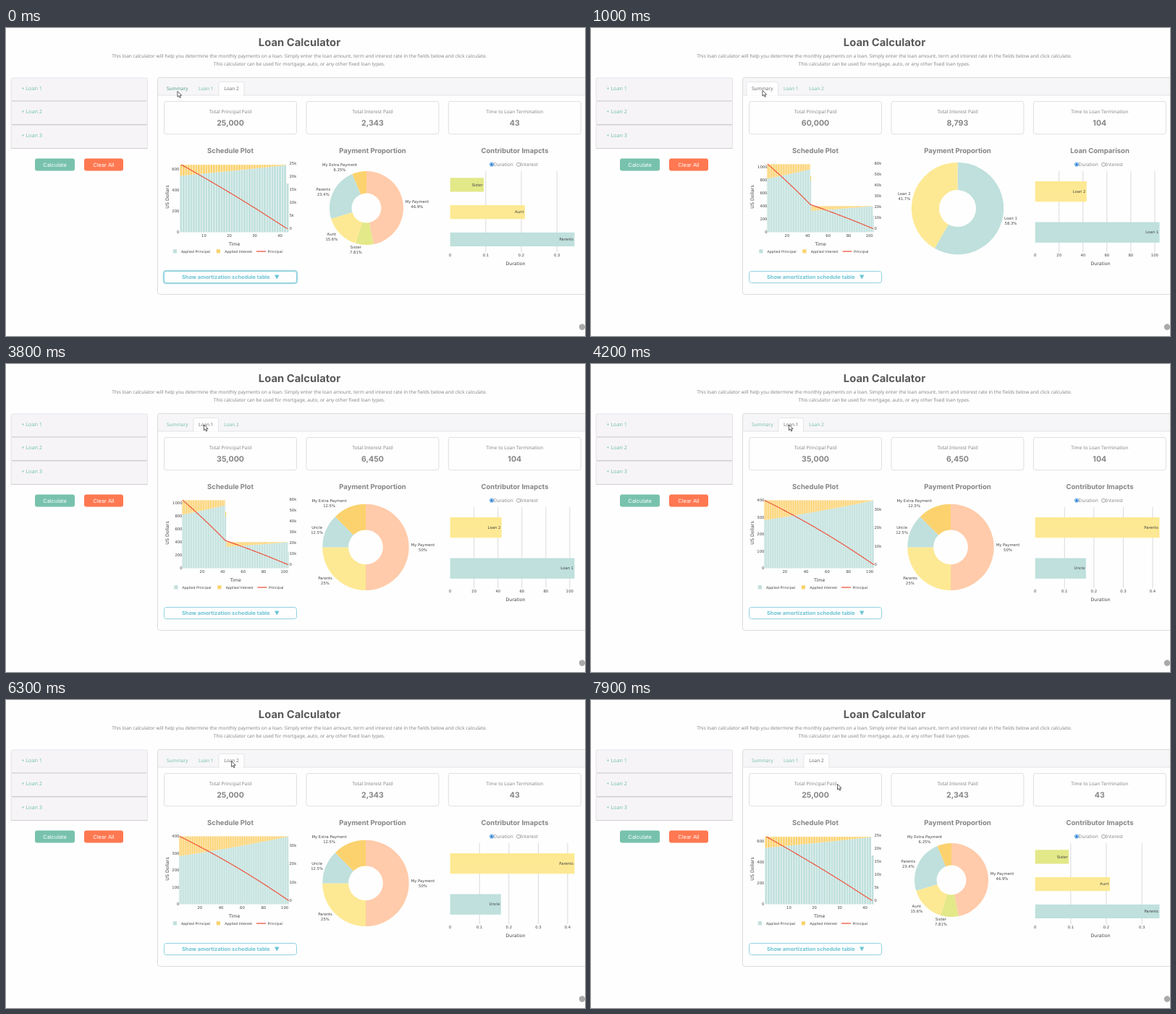
Recreate the animation shown at these times as an HTML page. Size 800x426 px, loop 8 s.

```html
<!DOCTYPE html>
<html lang="en">
<head>
<meta charset="utf-8">
<title>Loan Calculator</title>
<style>
  html, body { margin: 0; width: 100%; height: 100%; overflow: hidden; background: #fefefe; }
  svg { display: block; width: 100vw; height: 100vh; }
  text { font-family: "Noto Sans", "Open Sans", sans-serif; font-size: 6.57px; fill: #888; text-rendering: geometricPrecision; }
  .head { font-family: Inter, sans-serif; font-weight: 700; font-size: 9.5px; fill: #858585; }
  .title { font-size: 14.8px; fill: #5a5a5a; }
  .num { font-size: 10.6px; }
  .btn { font-family: Inter, sans-serif; font-size: 7.4px; fill: #fff; }
  .show { font-family: Inter, sans-serif; font-weight: 700; font-size: 7.35px; fill: #6cc3d5; }
  .side { font-size: 7.2px; fill: #78c2ad; }
  .plot { font-family: "DejaVu Sans", Verdana, sans-serif; font-size: 5.3px; fill: #444; }
  .axis { font-size: 6.25px; }
  .legend { font-size: 4.8px; }
  .mid { text-anchor: middle; }
  .end { text-anchor: end; }
</style>
</head>
<body>
<svg id="stage" viewBox="0 0 800 426" preserveAspectRatio="none"></svg>
<script>
const TEAL = '#bfe0dc', YELLOW = '#fde993', GOLD = '#fcd26f', PEACH = '#ffcbaa', LIME = '#e3e888', RED = '#ee5640';
const LOOP = 8000, STEP = 100;

const rect = (x, y, w, h, fill, more = '') =>
  `<rect x="${x}" y="${y}" width="${w}" height="${h}" fill="${fill}" ${more}/>`;
const text = (x, y, s, cls = '', more = '') => `<text x="${x}" y="${y}" class="${cls}" ${more}>${s}</text>`;
const line = (x1, y1, x2, y2, color, w = 1) =>
  `<path d="M${x1} ${y1}L${x2} ${y2}" stroke="${color}" stroke-width="${w}"/>`;

// Month by month: principal part, interest part, remaining balance.
function amortize(balance, yearly, payment) {
  const rows = [];
  while (balance > 0.01) {
    const interest = balance * yearly / 12;
    const principal = Math.min(payment - interest, balance);
    balance -= principal;
    rows.push({ principal, interest, balance });
  }
  return rows;
}

const first = amortize(35000, 0.04, 400);
const second = amortize(25000, 0.05, 640);
const none = { principal: 0, interest: 0, balance: 0 };
const both = first.map((a, i) => {
  const b = second[i] || none;
  return {
    principal: a.principal + b.principal,
    interest: a.interest + b.interest,
    balance: a.balance + b.balance
  };
});

const views = {
  summary: {
    tab: ['Summary', 215, 43.5],
    cards: ['60,000', '8,793', '104'],
    barTitle: 'Loan Comparison',
    plot: { rows: both, x0: 242.5, dx: 1.42, sy: 0.0905, sb: 0.00151, yStep: 200, yMax: 1000, xStep: 20, xMax: 100, bStep: 10, bMax: 60, shift: 1.5 },
    pie: { cx: 506.5, cy: 249.6, r: 63.7, parts: [
      [58.3, TEAL, 'Loan 1', 580, 265.2], [41.7, YELLOW, 'Loan 2', 432.8, 231.2]] },
    bars: { unit: 1.6522, step: 20, max: 100, h: 28.3, tops: [212, 268.5],
      items: [['Loan 2', 43, YELLOW], ['Loan 1', 104, TEAL]] }
  },
  loan1: {
    tab: ['Loan 1', 259, 34.5],
    cards: ['35,000', '6,450', '104'],
    barTitle: 'Contributor Imapcts',
    plot: { rows: first, x0: 238.4, dx: 1.4675, sy: 0.235, sb: 0.00256, yStep: 100, yMax: 400, xStep: 20, xMax: 100, bStep: 10, bMax: 30, shift: 0 },
    pie: { cx: 497, cy: 253.4, r: 59.7, parts: [
      [50, PEACH, 'My Payment', 576, 252], [25, YELLOW, 'Parents', 441, 297.8],
      [12.5, TEAL, 'Uncle', 429.6, 228], [12.5, GOLD, 'My Extra Payment', 446.6, 191]] },
    bars: { unit: 405.7, step: 0.1, max: 0.4, h: 28.3, tops: [212, 268.5],
      items: [['Parents', 0.4233, YELLOW], ['Uncle', 0.173, TEAL]] }
  },
  loan2: {
    tab: ['Loan 2', 294, 35],
    cards: ['25,000', '2,343', '43'],
    barTitle: 'Contributor Imapcts',
    plot: { rows: second, x0: 238.4, dx: 3.505, sy: 0.1458, sb: 0.00362, yStep: 200, yMax: 600, xStep: 10, xMax: 40, bStep: 5, bMax: 25, shift: 0 },
    pie: { cx: 498, cy: 249, r: 51, parts: [
      [46.9, PEACH, 'My Payment', 568, 242.3], [7.81, LIME, 'Sister', 483.4, 305.2],
      [15.6, YELLOW, 'Aunt', 449.8, 286.8], [23.4, TEAL, 'Parents', 438.3, 224.8],
      [6.25, GOLD, 'My Extra Payment', 461, 191]] },
    bars: { unit: 491.6, step: 0.1, max: 0.3, h: 19.2, tops: [207.3, 245, 282.8],
      items: [['Sister', 0.0945, LIME], ['Aunt', 0.21, YELLOW], ['Parents', 0.3495, TEAL]] }
  }
};

function schedulePlot(p) {
  const base = 282.5, zero = 277.5, w = p.dx * 0.8;
  let out = '', path = '';
  p.rows.forEach((row, i) => {
    const x = p.x0 + (i + 1) * p.dx;
    const hp = row.principal * p.sy, hi = row.interest * p.sy;
    const left = x - w / 2, width = Math.min(w, 391 - left);
    out += rect(left, base - hp, width, hp, TEAL) + rect(left, base - hp - hi, width, hi, GOLD);
    path += `${i ? 'L' : 'M'}${x} ${zero - row.balance * p.sb}`;
  });
  out += `<path d="${path}" fill="none" stroke="${RED}" stroke-width="1.2"/>`;
  for (let v = 0; v <= p.yMax; v += p.yStep)
    out += text(p.x0 + 1, base - v * p.sy + 1.9, v, 'plot end');
  for (let v = p.xStep; v <= p.xMax; v += p.xStep)
    out += text(p.x0 + v * p.dx, 289, v, 'plot mid');
  for (let v = 0; v <= p.bMax; v += p.bStep)
    out += text(391.5, zero - v * 1000 * p.sb + 1.9, v ? v + 'k' : 0, 'plot');
  out += text(0, 0, 'US Dollars', 'plot axis mid', 'transform="translate(225 233.5) rotate(-90)"');
  const s = p.shift;
  return out + text(315.6 + s, 301, 'Time', 'plot axis mid') +
    rect(230.8 + s, 306.2, 5.2, 5.2, TEAL) + text(242 + s, 310.7, 'Applied Principal', 'plot legend') +
    rect(290.8 + s, 306.2, 5.2, 5.2, GOLD) + text(302.2 + s, 310.7, 'Applied Interest', 'plot legend') +
    line(346 + s, 309, 359 + s, 309, RED, 1.3) + text(361.5 + s, 310.7, 'Principal', 'plot legend');
}

function pieChart({ cx, cy, r, parts }) {
  const hole = r * 0.4, total = parts.reduce((sum, p) => sum + p[0], 0);
  const at = (turn, rad) => {
    const a = turn * 2 * Math.PI;
    return `${cx + rad * Math.sin(a)} ${cy - rad * Math.cos(a)}`;
  };
  let from = 0;
  return parts.map(([share, fill, name, x, y]) => {
    const to = from + share / total, big = to - from > 0.5 ? 1 : 0;
    const d = `M${at(from, r)}A${r} ${r} 0 ${big} 1 ${at(to, r)}L${at(to, hole)}A${hole} ${hole} 0 ${big} 0 ${at(from, hole)}Z`;
    from = to;
    return `<path d="${d}" fill="${fill}"/>` + text(x, y, name, 'plot mid') + text(x, y + 6.9, share + '%', 'plot mid');
  }).join('');
}

function barChart({ unit, step, max, h, tops, items }) {
  const x0 = 613.7;
  let out = '';
  for (let i = 0; i * step <= max + 1e-6; i++) {
    const x = x0 + i * step * unit;
    if (i) out += line(x, 198, x, 310, '#dad8dc');
    out += text(x, 316.3, +(i * step).toFixed(1), 'plot mid');
  }
  items.forEach(([name, value, fill], i) => {
    const w = value * unit;
    out += rect(x0, tops[i], w, h, fill) + text(x0 + w - 1.4, tops[i] + h / 2 + 1.8, name, 'plot end');
  });
  return out + text(704, 327.6, 'Duration', 'plot axis mid');
}

function sidebar() {
  let out = '';
  [69, 101.5, 134.5].forEach((y, i) => {
    out += rect(7, y, 188.5, 32, '#f6f4f7', 'rx="1.5" stroke="#e0dee1" stroke-width=".8"') +
      line(7, y + 32, 195.5, y + 32, '#cfcdd0') + text(21.3, y + 16.7, '+ Loan ' + (i + 1), 'side');
  });
  return out + rect(40, 180.5, 55, 17, '#78c2ad', 'rx="3"') + text(67.5, 191.5, 'Calculate', 'btn mid') +
    rect(108, 180.5, 54, 17, '#ff7851', 'rx="3"') + text(135, 191.5, 'Clear All', 'btn mid');
}

function cards() {
  return ['Total Principal Paid', 'Total Interest Paid', 'Time to Loan Termination'].map((label, i) => {
    const x = 218.5 + i * 196.4;
    return rect(x, 101.5, 183, 45.2, '#fefefe', 'rx="3" stroke="#dfdfe0"') +
      text(x + 91.5, 118.4, label, 'mid') + text(x + 91.5, 135.4, '', 'head num mid', `id="num${i}"`);
  }).join('');
}

const names = Object.keys(views);
const layer = (kind, draw) => names.map(n => `<g id="${kind}-${n}">${draw(views[n][kind])}</g>`).join('');
const tabs = names.map(n => {
  const [label, x, w] = views[n].tab;
  return `<path id="back-${n}" d="M${x} 93.5V77q0-2.5 2.5-2.5H${x + w - 2.5}q2.5 0 2.5 2.5V93.5" fill="#fefefe" stroke="#e2e1e3" stroke-width=".8"/>` +
    text(x + w / 2, 86.2, label, 'mid', `id="tab-${n}"`);
}).join('');

document.getElementById('stage').innerHTML =
  rect(0, 0, 800, 426, '#fefefe') +
  text(405.5, 25.3, 'Loan Calculator', 'head title mid') +
  text(405.3, 41.3, 'This loan calculator will help you determine the monthly payments on a loan. Simply enter the loan amount, term and interest rate in the fields below and click calculate.', 'mid') +
  text(405.3, 51.8, 'This calculator can be used for mortgage, auto, or any other fixed loan types.', 'mid') +
  sidebar() +
  rect(209.5, 68.5, 600, 300, '#fefefe', 'rx="3"') +
  '<path d="M209.5 93V71.500q0-3 3-3H810V93Z" fill="#f6f5f7"/>' + line(209.5, 93, 800, 93, '#dddcde', 0.8) +
  rect(209.5, 68.5, 600, 300, 'none', 'rx="3" stroke="#dcdbdd"') +
  tabs + cards() +
  text(310, 172.9, 'Schedule Plot', 'head mid') +
  text(506.5, 172.9, 'Payment Proportion', 'head mid') +
  text(703, 172.9, '', 'head mid', 'id="barTitle"') +
  '<circle cx="671" cy="188.800" r="2.500" fill="#fff" stroke="#1a78d8" stroke-width=".8"/><circle cx="671" cy="188.800" r="1.600" fill="#1a78d8"/>' +
  text(673.6, 191.4, 'Duration') +
  '<circle cx="708" cy="188.800" r="2.500" fill="#fff" stroke="#858585" stroke-width=".7"/>' +
  text(710.8, 191.4, 'Interest') +
  layer('plot', schedulePlot) + layer('pie', pieChart) + layer('bars', barChart) +
  rect(217.8, 335.8, 184.4, 17.4, 'none', 'id="ring" rx="3.5" stroke="#a6dbe6" stroke-width="2.2"') +
  rect(218.5, 336.5, 183, 16, '#fefefe', 'rx="3" stroke="#84cddb" stroke-width=".9"') +
  text(243, 347, 'Show amortization schedule table', 'show') +
  '<path d="M371 341.500h6.500l-3.250 6Z" fill="#6cc3d5"/>' +
  '<circle cx="796" cy="413.500" r="4.200" fill="#a9a9a9"/>' +
  '<path id="cursor" d="M0 0V7.800L1.800 6.200L3.100 9L4.400 8.400L3.200 5.700H5.600Z" fill="#fff" stroke="#333" stroke-width=".8" stroke-linejoin="round"/>';

const el = id => document.getElementById(id);
const pick = (t, list) => list.filter(e => e[0] <= t).pop()[1];

const timeline = {
  tab: [[0, 'loan2'], [400, 'summary'], [3100, 'loan1'], [6000, 'loan2']],
  cards: [[0, 'loan2'], [600, 'summary'], [3300, 'loan1'], [6200, 'loan2']],
  pie: [[0, 'loan2'], [1000, 'summary'], [3700, 'loan1'], [6600, 'loan2']],
  plot: [[0, 'loan2'], [1000, 'summary'], [4000, 'loan1'], [6600, 'loan2']]
};
const track = [
  [0, 237, 87.5], [400, 237, 86.3], [1800, 237, 86.3], [2500, 272, 83.7], [2700, 273.5, 84],
  [5400, 273.5, 84], [5900, 311.6, 84.6], [7600, 311.6, 84.6], [7900, 340.5, 116.2], [LOOP, 340.5, 116.2]
];

function pointer(t) {
  const i = track.findIndex(k => k[0] > t);
  const [t0, x0, y0] = track[i - 1], [t1, x1, y1] = track[i];
  const u = (t - t0) / (t1 - t0), e = u * u * (3 - 2 * u);
  return [x0 + (x1 - x0) * e, y0 + (y1 - y0) * e];
}

function render(ms) {
  const t = Math.floor(ms % LOOP / STEP) * STEP;
  const tab = pick(t, timeline.tab), shown = views[pick(t, timeline.cards)];
  const pie = pick(t, timeline.pie), plot = pick(t, timeline.plot);
  const [x, y] = pointer(t);
  const show = (id, on) => { el(id).style.display = on ? '' : 'none'; };
  names.forEach(n => {
    const [, left, w] = views[n].tab;
    const hover = y < 93 && x >= left && x < left + w;
    show('back-' + n, n === tab);
    el('tab-' + n).style.fill = n === tab ? '#707070' : hover ? '#559f8b' : '#78c2ad';
    show('plot-' + n, n === plot);
    show('bars-' + n, n === plot);
    show('pie-' + n, n === pie);
  });
  shown.cards.forEach((v, i) => { el('num' + i).textContent = v; });
  el('barTitle').textContent = shown.barTitle;
  show('ring', t < 400);
  el('cursor').setAttribute('transform', `translate(${x} ${y})`);
}

const start = performance.now();
function tick() {
  render(performance.now() - start);
  requestAnimationFrame(tick);
}
tick();
</script>
</body>
</html>
```
